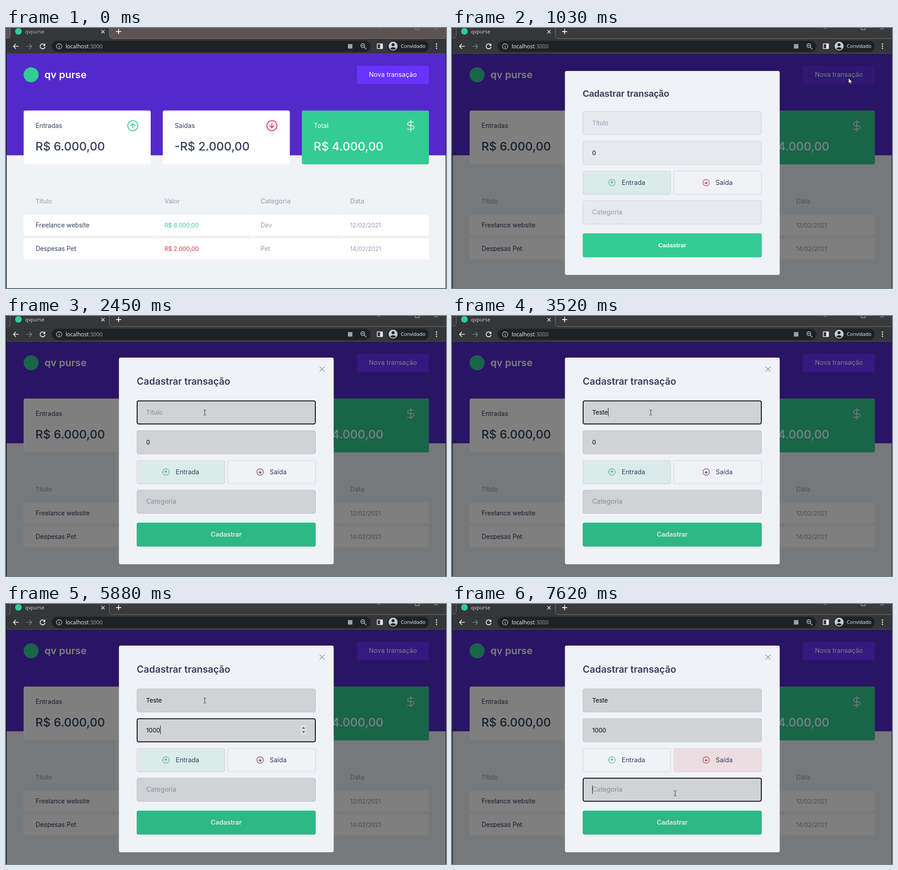
An HTML page that plays this animation: 973 by 575 pixels, repeating every 8000 ms.

```html
<!DOCTYPE html>
<html lang="pt-BR">
<head>
<meta charset="utf-8">
<title>qvpurse</title>
<style>
  html, body { margin: 0; width: 100%; height: 100%; overflow: hidden; background: #f0f2f5; }
  svg { display: block; width: 973px; height: 575px; }
  text { font-family: Inter, "Open Sans", sans-serif; white-space: pre; }
  .ui { font-family: "Open Sans", "Noto Sans", sans-serif; }
  .fallback { font-family: "Liberation Sans", Arial, sans-serif; }
  .line { fill: none; stroke-linecap: round; stroke-linejoin: round; }
</style>
</head>
<body>
<svg id="stage" viewBox="0 0 973 575" xmlns="http://www.w3.org/2000/svg"></svg>
<script>
const INK = '#363f5f', MUTED = '#969cb3', GREEN = '#33cc95', RED = '#e52e4d';
const LOOP = 8000;

const rect = (x, y, w, h, fill, r = 0, extra = '') =>
  `<rect x="${x}" y="${y}" width="${w}" height="${h}" rx="${r}" fill="${fill}" ${extra}/>`;
const circle = (x, y, r, fill, extra = '') =>
  `<circle cx="${x}" cy="${y}" r="${r}" fill="${fill}" ${extra}/>`;
const text = (x, y, str, size, fill, extra = '') =>
  `<text x="${x}" y="${y}" font-size="${size}" fill="${fill}" ${extra}>${str}</text>`;
const line = (d, stroke, w = 1.5, extra = '') =>
  `<path class="line" d="${d}" stroke="${stroke}" stroke-width="${w}" ${extra}/>`;
const group = (id, body, extra = '') => `<g id="${id}" ${extra}>${body}</g>`;

// Circled arrow; dir is -1 for up, 1 for down
const arrowIcon = (x, y, r, dir, color, w) => {
  const k = r * 0.42;
  return circle(x, y, r, 'none', `stroke="${color}" stroke-width="${w}"`) +
    line(`M${x} ${y - dir * k}V${y + dir * k}M${x - k} ${y}L${x} ${y + dir * k}L${x + k} ${y}`, color, w);
};

function browserBar() {
  const white = '#f1f1f1', grey = '#c4c7cb';
  return rect(0, 0, 973, 57, '#35363a') +
    rect(0, 0, 973, 23, '#3a3a3b', 0, 'id="strip"') +
    '<path d="M2 23.5Q9 23 9 15V0H229V15Q229 23 236 23.5Z" fill="#35363a"/>' +
    line('M2 23.5Q9.500 23 9.500 15V0M228.500 0V15Q229 23 236 23.500H972', '#77757a', 1) +
    circle(27.5, 7.5, 7.3, GREEN) +
    text(42, 12, 'qvpurse', 11.3, '#d6d7da', 'class="ui" id="tabName"') +
    line('M211 5l6.500 6.500M217.500 5l-6.500 6.500', white, 1.4) +
    line('M244 8h10M249 3v10', white, 1.8) +
    group('caption', line('M822 .2h5M905 0v3.500h9V0M947.500 3.500l3.500-3.500M954.500 3.500L951 0', '#cfcfcf', 1)) +
    line('M27.500 40.500H17M21.500 35.500l-5 5 5 5', white, 1.7) +
    line('M46 40.500H56.500M52 35.500l5 5-5 5', '#7d7f83', 1.7) +
    line('M85 36.800A5.500 5.500 0 1 0 86.300 42', white, 1.8) +
    '<path d="M87 34v5.500h-5.500z" fill="#f1f1f1"/>' +
    rect(101, 28, 705, 25, '#202124', 12.5) +
    circle(117.5, 40.5, 5.8, 'none', `stroke="${grey}" stroke-width="1.2"`) +
    line('M117.500 40v3.500M117.500 37.600v.1', grey, 1.3) +
    text(132, 45, 'localhost<tspan fill="#9aa0a6">:3000</tspan>', 12.1, '#f4f4f4', 'class="ui"') +
    rect(756, 35.5, 10, 10, '#9aa0a6') +
    circle(789, 39, 4.3, 'none', `stroke="${grey}" stroke-width="1.4"`) +
    line('M792.500 42.500l4 4M787 39h4', grey, 1.4) +
    rect(821, 35, 11.5, 10.5, 'none', 0.5, 'stroke="#f1f1f1" stroke-width="1.6"') +
    rect(827.5, 35, 5, 10.5, white) +
    rect(844, 28, 91, 25, '#202124', 12.5) +
    circle(856, 40, 10, '#c5c8d6') +
    circle(856, 37, 3.2, '#202124') +
    '<path d="M849.500 45.500Q856 39.500 862.500 45.500Q856 50.500 849.500 45.500Z" fill="#202124"/>' +
    text(873, 44.3, 'Convidado', 10.9, '#eeeeee', 'class="ui"') +
    [35.5, 40.2, 44.9].map(y => circle(952, y, 1.4, white)).join('') +
    rect(0, 56, 973, 1, '#4b4a50');
}

function card(x, label, value, fill, ink) {
  return rect(x, 182.5, 281, 119, fill, 4) +
    text(x + 26.3, 221, label, 14.2, ink) +
    text(x + 26, 270.5, value, 26, ink, 'font-weight="500"');
}

function tableRow(y, cells) {
  const edges = [39, 323, 536, 733, 935];
  const colors = [INK, cells.tone, MUTED, MUTED];
  const sizes = [13.9, 13, 13.8, 13];
  const xs = [65.5, 350.5, 562.7, 761];
  return cells.row.map((str, i) =>
    rect(edges[i], y, edges[i + 1] - edges[i], 46.5, '#fff', 4) +
    text(xs[i], y + 27.8, str, sizes[i], colors[i])).join('');
}

function page() {
  const heads = [['Título', 65.5, 13.6], ['Valor', 350.5, 14.2], ['Categoria', 562.7, 14.5], ['Data', 761, 14.4]];
  return rect(0, 57, 973, 518, '#f0f2f5') +
    rect(0, 57, 973, 224.5, '#5429cc') +
    circle(55.5, 103.5, 16.6, GREEN) +
    text(85, 111, 'qv purse', 22, '#fff', 'font-weight="600"') +
    rect(776, 83.5, 159, 40, '#6933ff', 4, 'id="newButton"') +
    text(855.5, 108.3, 'Nova transação', 14.3, '#fff', 'text-anchor="middle"') +
    card(39, 'Entradas', 'R$ 6.000,00', '#fff', INK) +
    card(346.7, 'Saídas', '-R$ 2.000,00', '#fff', INK) +
    card(654.3, 'Total', 'R$ 4.000,00', GREEN, '#fff') +
    arrowIcon(280.5, 216, 11.2, -1, GREEN, 1.8) +
    arrowIcon(588, 216, 11.2, 1, RED, 1.8) +
    line('M12 1v22M17.500 5H9.500a3.500 3.500 0 0 0 0 7h5a3.500 3.500 0 0 1 0 7H5.500', '#fff', 1.35,
      'transform="translate(881.500 202.300) scale(1.14)"') +
    heads.map(([str, x, size]) => text(x, 388, str, size, MUTED)).join('') +
    tableRow(413, { row: ['Freelance website', 'R$ 6.000,00', 'Dev', '12/02/2021'], tone: GREEN }) +
    tableRow(465, { row: ['Despesas Pet', 'R$ 2.000,00', 'Pet', '14/02/2021'], tone: RED });
}

const FIELD_TOP = { title: 187, amount: 253, category: 384.5 };

function modal() {
  const box = (x, y, w, fill, extra = '') =>
    rect(x + 0.5, y + 0.5, w - 1, 51.5, fill, 4, `stroke="#d3d4d8" ${extra}`);
  const fields = Object.entries(FIELD_TOP).map(([id, y]) =>
    box(289, y, 396, '#e7e9ee') + text(310, y + 30.7, '', 13.5, '#000', `id="${id}"`)).join('');
  const radios = box(289, 319, 195, '#f0f2f5') + box(490, 319, 195, '#f0f2f5') +
    box(289, 319, 195, '#dbebe9', 'id="incomeTint"') + box(490, 319, 195, '#ebdde1', 'id="outcomeTint"') +
    arrowIcon(353.5, 345, 7.2, -1, '#3db58d', 1.2) +
    group('outcomeIcon', arrowIcon(562, 345, 7.2, 1, 'currentColor', 1.2)) +
    text(375.3, 349.7, 'Entrada', 14.3, INK) + text(583, 349.7, 'Saída', 14.3, INK);
  const spinner = rect(652, 268, 12, 21, '#dedfe1') +
    '<path d="M654.500 275.500l3.500-3.500 3.500 3.500zM654.500 281.500l3.500 3.500 3.500-3.500z" fill="#444"/>';
  return group('modal',
    rect(0, 57, 973, 518, '#000', 0, 'opacity=".5"') +
    rect(249.7, 92, 475, 457, '#f0f2f7', 4, 'id="panel"') +
    text(289, 152.3, 'Cadastrar transação', 21, INK, 'id="heading" font-weight="600"') +
    line('M694 112.800l9.700 9.700M703.700 112.800l-9.700 9.700', '#93969f', 1.4, 'id="close"') +
    group('form',
      group('inputs', fields + rect(289, 457, 396, 53, GREEN, 4) +
        text(487, 488, 'Cadastrar', 14.4, '#fff', 'id="submit" font-weight="600" text-anchor="middle"')) +
      radios + group('spinner', spinner) +
      group('selection', rect(309.5, 269, 9.5, 20, '#2f7fd8') + text(310, 283.7, '0', 13.5, '#fff')) +
      rect(290, 0, 394, 51, 'none', 3.5, 'id="focus" stroke="#111" stroke-width="2"') +
      rect(310, 0, 1, 19, '#111', 0, 'id="caret"')));
}

const cursors =
  group('arrow', '<path d="M0 0V11.200L2.600 8.900L4.300 12.800L6.200 12L4.500 8.200H8Z" fill="#fff" stroke="#222" stroke-width=".8"/>') +
  group('beam', line('M-2.500-5.500H-.6L0-5 .6-5.500H2.500M0-5V5M-2.500 5.500H-.6L0 5 .6 5.500H2.500', '#3a3a3c', 1));

document.getElementById('stage').innerHTML =
  page() + modal() + browserBar() +
  rect(0, 23, 1.5, 552, '#1d1c20') + rect(972, 23, 1, 552, '#1d1c20') + cursors;

const el = {};
document.querySelectorAll('[id]').forEach(node => { el[node.id] = node; });
const show = (node, on) => node.setAttribute('visibility', on ? 'inherit' : 'hidden');
const set = (node, attrs) => Object.entries(attrs).forEach(([k, v]) => node.setAttribute(k, v));
const ramp = (t, start, length = 200) => Math.min(1, Math.max(0, (t - start) / length));

// Movement advances in even ticks: [start, end, count]
const bursts = [[200, 970, 12], [1030, 1780, 11], [1850, 2050, 3], [6550, 7290, 12], [7360, 7620, 4]];
function tick(t) {
  let now = 0;
  for (const [start, end, count] of bursts) {
    if (t < start) break;
    const step = (end - start) / (count - 1);
    now = Math.min(end, start + Math.floor((t - start) / step + 1e-6) * step);
  }
  return now;
}

const pointer = [
  [200, 905, 460], [480, 893, 250], [690, 880, 122], [830, 877, 113], [970, 877, 111],
  [1030, 877, 111], [1180, 860, 118], [1480, 620, 180], [1780, 455, 212], [1920, 441, 213],
  [2050, 439, 213], [6480, 439, 213], [6700, 480, 280], [6900, 535, 340], [7100, 540, 347],
  [7220, 520, 375], [7290, 503, 400], [7480, 494, 416], [7620, 493, 418]
];
function pointerAt(t) {
  const i = pointer.findIndex(p => p[0] >= t);
  if (i <= 0) return (i ? pointer[pointer.length - 1] : pointer[0]).slice(1);
  const [t0, x0, y0] = pointer[i - 1], [t1, x1, y1] = pointer[i];
  const k = (t - t0) / (t1 - t0);
  return [x0 + (x1 - x0) * k, y0 + (y1 - y0) * k];
}

// [time, focused field, title, amount, caret]
const states = [
  [0, '', '', '0', 0],
  [1920, 'title', '', '0', 1], [2450, 'title', '', '0', 0], [2990, 'title', '', '0', 1],
  [3180, 'title', 'T', '0', 1], [3290, 'title', 'Te', '0', 1], [3400, 'title', 'Tes', '0', 1],
  [3520, 'title', 'Teste', '0', 1], [4050, 'title', 'Teste', '0', 0],
  [4450, 'amount', 'Teste', '0', 0], [5260, 'amount', 'Teste', '1', 1],
  [5530, 'amount', 'Teste', '10', 1], [5730, 'amount', 'Teste', '100', 1],
  [5880, 'amount', 'Teste', '1000', 1], [6410, 'amount', 'Teste', '1000', 0],
  [6950, '', 'Teste', '1000', 0], [7530, 'category', 'Teste', '1000', 1]
];

function fill(node, value, placeholder, size) {
  node.textContent = value || placeholder;
  set(node, { fill: value ? '#000' : MUTED, 'font-size': value ? 13.4 : size });
}

function drawForm(t, now) {
  const [, focus, title, amount, caret] = states.filter(s => s[0] <= t).pop();
  const loaded = t >= 1100;
  const chosen = ramp(now, 6960, 130);

  set(el.panel, loaded ? { y: 92, height: 457 } : { y: 95, height: 451 });
  set(el.heading, { class: loaded ? '' : 'fallback', 'font-size': loaded ? 21 : 19.8 });
  set(el.submit, { class: loaded ? '' : 'fallback', 'font-size': loaded ? 14.4 : 13.2 });
  set(el.form, { transform: `translate(0 ${loaded ? 0 : -3})` });
  show(el.close, loaded);
  el.inputs.style.filter = `brightness(${1 - 0.1 * ramp(now, 1030)})`;

  fill(el.title, title, 'Título', 13.6);
  fill(el.amount, amount, '', 13.4);
  fill(el.category, '', 'Categoria', 14.5);
  el.incomeTint.style.opacity = 1 - chosen;
  el.outcomeTint.style.opacity = chosen;
  el.outcomeIcon.style.color = !loaded || chosen > 0.5 ? '#b43b54' : '#65395a';

  show(el.focus, focus);
  show(el.caret, caret);
  show(el.spinner, focus === 'amount');
  show(el.selection, focus === 'amount' && amount === '0');
  if (!focus) return;
  const typed = focus === 'category' ? 0 : (focus === 'title' && !title ? 0 : el[focus].getComputedTextLength());
  set(el.focus, { y: FIELD_TOP[focus] + 0.8 });
  set(el.caret, { x: Math.round(310 + typed), y: Math.round(FIELD_TOP[focus] + 16) });
}

function draw(t) {
  const now = tick(t);
  const active = t >= 900, open = t >= 1030;
  el.strip.setAttribute('fill', active ? '#3a3a3b' : '#5d5452');
  el.tabName.setAttribute('fill', active ? '#d6d7da' : '#b9babd');
  el.caption.setAttribute('opacity', active ? 1 : 0.45);

  const hover = ramp(now, 690) - ramp(now, 1200);
  el.newButton.style.filter = `brightness(${1 - 0.1 * hover})`;

  show(el.modal, open);
  if (open) drawForm(t, now);

  const [x, y] = pointerAt(now);
  const overField = open && x > 289 && x < 685 &&
    Object.values(FIELD_TOP).some(top => y >= top && y <= top + 52);
  show(el.arrow, t >= 200 && !overField);
  show(el.beam, t >= 200 && overField);
  const place = { transform: `translate(${Math.round(x)} ${Math.round(y)})` };
  set(el.arrow, place);
  set(el.beam, { transform: `translate(${Math.round(x) + 0.5} ${Math.round(y) + 0.5})` });
}

const start = performance.now();
function frame() {
  draw((performance.now() - start) % LOOP);
  requestAnimationFrame(frame);
}
frame();
</script>
</body>
</html>
```
